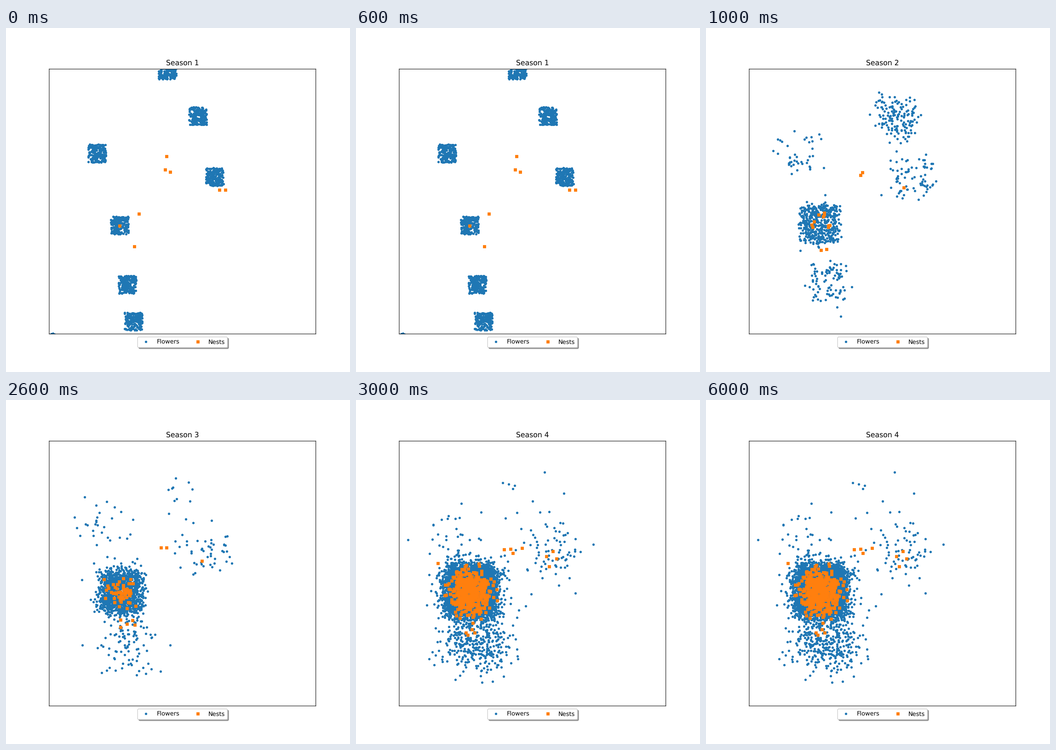
Animation, 748 px wide and 748 px high, one loop 8 s. Source, as a matplotlib script:

```python
import numpy as np
import matplotlib.pyplot as plt
from matplotlib.animation import FuncAnimation

SIZE = 748
BLUE, ORANGE = "#1f77b4", "#ff7f0e"
LEFT, RIGHT, BOTTOM, TOP = np.array([100.5, 720.5, 88.5, 704.5]) / 800

# Flower patches in stage pixels; the one at HOME takes over.
PATCHES = np.array([(351, 92), (417, 191), (198, 272.5), (454, 323.5),
                    (247, 429), (263.5, 558), (277, 638), (86, 683)])
HOME = 4
HUB = np.array([265, 330])

# Per season: flowers in each patch, box half-width, blur, pull to the hub.
FLOWERS = [
    ([200] * 8, 19.3, 0, 0),
    ([0, 145, 41, 75, 480, 85, 4, 0], 41, 4, 0.03),
    ([0, 10, 28, 50, 1200, 90, 1, 0], 41, 9, 0.12),
    ([0, 8, 27, 78, 6000, 400, 0, 0], 45, 11, 0.15),
]

FIRST_NESTS = [(349, 279), (345.5, 308), (356.5, 313), (463.5, 352),
               (476.5, 352), (288.5, 404.5), (246.5, 430.5), (279, 475.5)]
# Later nests: around home and at three outposts, as (count, half, blur).
NEST_SITES = [(249, 417), (340, 321), (428, 347), (264, 490)]
LATER_NESTS = [
    [(10, 20, 1), (2, 7, 0), (1, 8, 0), (2, 14, 0)],
    [(58, 24, 7), (2, 10, 0), (1, 4, 0), (5, 18, 0)],
    [(470, 30, 11), (4, 25, 0), (4, 18, 0), (8, 28, 0)],
]

rng = np.random.default_rng(12)


def cloud(center, count, half, blur):
    """Points spread evenly over a square, with a long-tailed blur."""
    box = rng.uniform(-half, half, (count, 2))
    return center + box + blur * rng.standard_t(8, (count, 2))


def grow_flowers(counts, half, blur, pull):
    centers = PATCHES + pull * (HUB - PATCHES)
    return np.vstack([
        cloud(center, count, half, blur if i == HOME else 2 * blur)
        for i, (center, count) in enumerate(zip(centers, counts))])


def build_nests(groups):
    return np.vstack([cloud(site, *group)
                      for site, group in zip(NEST_SITES, groups)])


flower_sets = [grow_flowers(*season) for season in FLOWERS]
nest_sets = [np.array(FIRST_NESTS)] + [build_nests(g) for g in LATER_NESTS]

# Soft, unsnapped lines and letters.
plt.rcParams.update({"path.snap": False, "text.hinting": "none"})

fig, ax = plt.subplots(figsize=(8, 8), dpi=SIZE / 8)
fig.subplots_adjust(left=LEFT, right=RIGHT, bottom=BOTTOM, top=TOP)
ax.set_xlim(LEFT * SIZE, RIGHT * SIZE)
ax.set_ylim((1 - BOTTOM) * SIZE, (1 - TOP) * SIZE)
ax.set_xticks([])
ax.set_yticks([])

flowers, = ax.plot([], [], "o", ms=3, color=BLUE, label="Flowers")
nests, = ax.plot([], [], "s", ms=4, mew=0.7, color=ORANGE, label="Nests")
title = ax.set_title("Season 1")
ax.legend(loc="upper center", bbox_to_anchor=(0.5, 0), ncol=2,
          fancybox=True, shadow=True)


def update(second):
    season = min(second, len(FLOWERS) - 1)
    flowers.set_data(*flower_sets[season].T)
    nests.set_data(*nest_sets[season].T)
    title.set_text(f"Season {season + 1}")
    return flowers, nests, title


anim = FuncAnimation(fig, update, frames=8, interval=1000, repeat=True)
plt.show()
```
